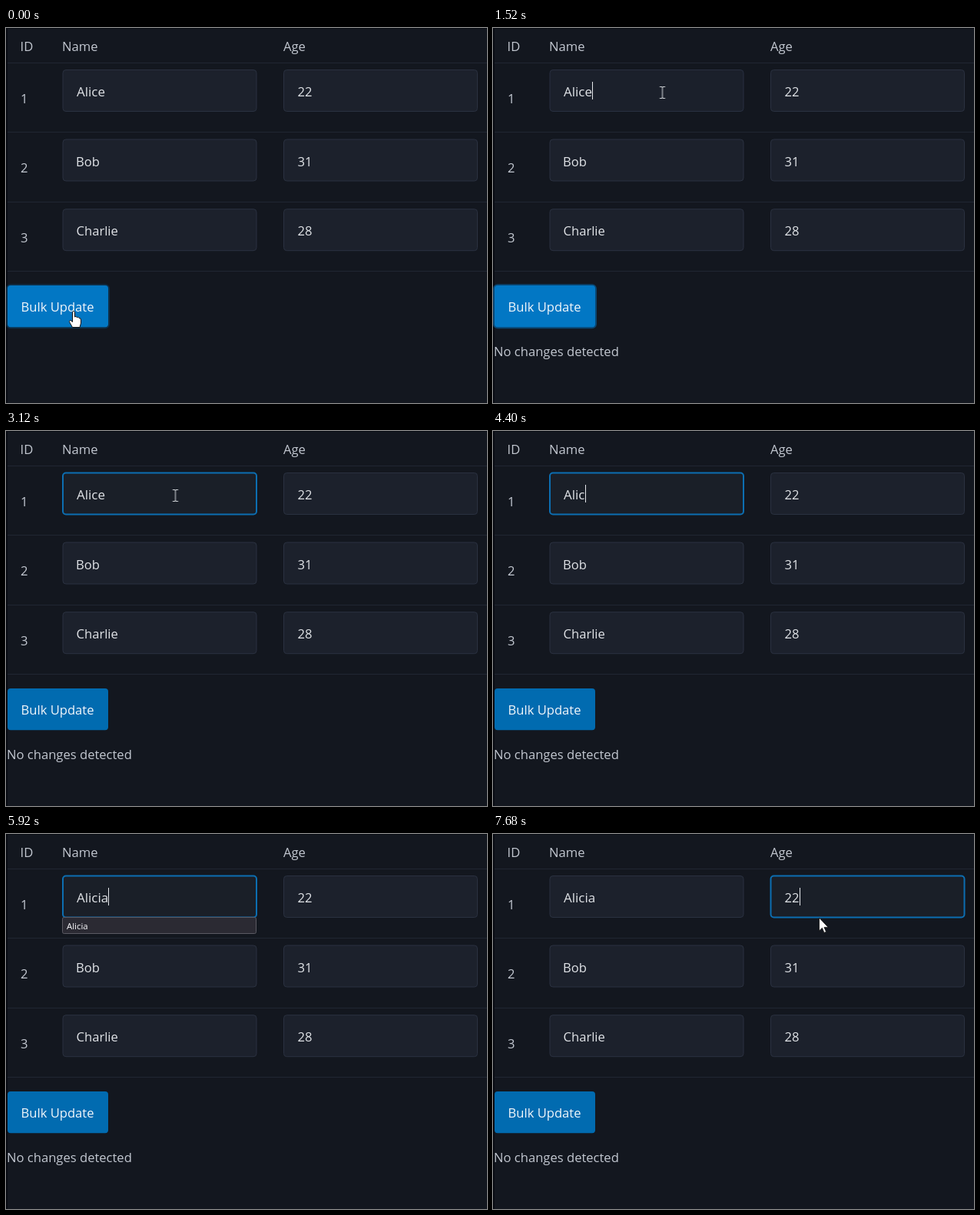
Write an HTML page that moves like this. It is 626x488 px and loops after 8000 ms.

```html
<!DOCTYPE html>
<html lang="en">
<head>
<meta charset="utf-8">
<title>Bulk update form</title>
<style>
html, body { margin: 0; width: 100%; height: 100%; overflow: hidden; background: #13171f; }
svg { display: block; width: 626px; height: 488px; }
text { font: 16.6px "Open Sans", "Noto Sans", sans-serif; fill: #c2c7d0; }
.value { fill: #e0e3e7; }
.name { font-size: 17px; }
.line { stroke: #202632; }
.box { fill: #1c212c; stroke: #2a3140; }
.focus { fill: #1a1f28; stroke: #0c6eb1; stroke-width: 2; }

/* 1% of the loop is 80 ms */
.anim { animation: 8s linear infinite; }
.step { animation: 8s step-end infinite; }

#button { animation-name: button; }
@keyframes button { 0%, 19% { fill: #0277c4; } 21.5%, 100% { fill: #016bb0; } }
#buttonRing { animation-name: buttonRing; }
@keyframes buttonRing { 0% { opacity: .5; } 1%, 19% { opacity: 1; } 21.5%, 100% { opacity: 0; } }
#message { animation-name: message; }
@keyframes message { 0% { opacity: 0; } 2%, 100% { opacity: 1; } }

#nameFocus { animation-name: nameFocus; }
@keyframes nameFocus { 0%, 19% { opacity: 0; } 21.5%, 82% { opacity: 1; } 84.5%, 100% { opacity: 0; } }
#ageFocus { animation-name: ageFocus; }
@keyframes ageFocus { 0%, 82% { opacity: 0; } 84.5%, 100% { opacity: 1; } }

#word1 { animation-name: word1; }
@keyframes word1 { 0% { opacity: 1; } 53%, 100% { opacity: 0; } }
#word2 { animation-name: word2; }
@keyframes word2 { 0% { opacity: 0; } 53% { opacity: 1; } 57%, 100% { opacity: 0; } }
#word3 { animation-name: word3; }
@keyframes word3 { 0% { opacity: 0; } 57% { opacity: 1; } 60%, 100% { opacity: 0; } }
#word4 { animation-name: word4; }
@keyframes word4 { 0% { opacity: 0; } 60%, 100% { opacity: 1; } }

#suggest { animation-name: suggest; }
@keyframes suggest { 0%, 60% { opacity: 0; } 61.5%, 81.99% { opacity: 1; } 82%, 100% { opacity: 0; } }
#suggest text { font-size: 11.4px; fill: #fbfbfe; }

#caretX { animation-name: caretX; }
@keyframes caretX {
  0% { transform: translateX(129px); }
  53% { transform: translateX(120px); }
  57% { transform: translateX(124px); }
  60% { transform: translateX(133px); }
  82%, 100% { transform: translateX(399px); }
}
#caret { animation-name: blink; }
@keyframes blink {
  0%, 26%, 39%, 66%, 88% { opacity: 0; }
  19%, 32%, 46%, 74%, 94%, 100% { opacity: 1; }
}

#pointer { animation-name: move; }
@keyframes move {
  0%, 5% { transform: translate(88px, 368px); }
  11% { transform: translate(231px, 203px); }
  16%, 75% { transform: translate(220.5px, 84px); }
  81%, 93% { transform: translate(470.5px, 93px); }
  96%, 100% { transform: translate(424px, 109px); }
}
#hand { animation-name: hand; }
@keyframes hand { 0% { opacity: 1; } 6.2%, 100% { opacity: 0; } }
#arrow { animation-name: arrow; }
@keyframes arrow {
  0%, 7.8%, 11.2%, 14.9%, 78.4% { opacity: 0; }
  6.2%, 9.8%, 13.4%, 77.5%, 95.9%, 100% { opacity: 1; }
}
#beam { animation-name: beam; }
@keyframes beam {
  0%, 9.8%, 13.4%, 53%, 77.5%, 95.9%, 100% { opacity: 0; }
  7.8%, 11.2%, 14.9%, 75%, 78.4% { opacity: 1; }
}
</style>
</head>
<body>
<svg viewBox="0 0 626 488">
  <defs>
    <rect id="field" width="252" height="54" rx="4"/>
    <g id="row">
      <use href="#field" x="74" class="box"/>
      <use href="#field" x="361.5" class="box"/>
    </g>
  </defs>

  <rect width="626" height="488" fill="#13171f"/>
  <path d="M0 0H626V1H2V488H0Z" fill="#080b12"/>
  <path class="line" d="M2 45.5H626M2 135.5H626M2 226.5H626M2 316.5H626"/>

  <text x="18.5" y="30">ID</text>
  <text x="73" y="30">Name</text>
  <text x="361" y="30">Age</text>
  <text x="19" y="98">1</text>
  <text x="19" y="188">2</text>
  <text x="19" y="279">3</text>

  <use href="#row" y="54.5"/>
  <use href="#row" y="145"/>
  <use href="#row" y="235.7"/>
  <g id="nameFocus" class="anim"><use href="#field" x="74" y="54.5" class="focus"/></g>
  <g id="ageFocus" class="anim"><use href="#field" x="361.5" y="54.5" class="focus"/></g>

  <g id="word1" class="step"><text class="value name" x="92" y="89">Alice</text></g>
  <g id="word2" class="step"><text class="value name" x="92" y="89">Alic</text></g>
  <g id="word3" class="step"><text class="value name" x="92" y="89">Alici</text></g>
  <g id="word4" class="step"><text class="value name" x="92" y="89">Alicia</text></g>
  <text class="value" x="91" y="180">Bob</text>
  <text class="value" x="91.5" y="270">Charlie</text>
  <text class="value" x="379.5" y="89">22</text>
  <text class="value" x="379.5" y="180">31</text>
  <text class="value" x="379.5" y="270">28</text>

  <g id="suggest" class="anim">
    <rect x="73.5" y="108.5" width="252" height="21" rx="2" fill="#2b2a33" stroke="#5b5a63"/>
    <text x="79" y="123.5">Alicia</text>
  </g>

  <rect id="buttonRing" class="anim" x="0" y="333.2" width="135" height="58" rx="6" fill="#0b4773"/>
  <rect id="button" class="anim" x="2" y="335" width="131" height="54.3" rx="4"/>
  <text x="19.5" y="369" style="fill:#f2f6fa">Bulk Update</text>
  <g id="message" class="step"><text x="1" y="427">No changes detected</text></g>

  <g id="caretX" class="step">
    <rect id="caret" class="step" y="70" width="1" height="23" fill="#e6e8ec"/>
  </g>

  <g id="pointer" class="anim">
    <path id="hand" class="step" fill="#fff" stroke="#111" stroke-linejoin="round"
      d="M-1.5 1.5Q0 -1 1.5 1.5V8Q3 6.5 4.3 8.5Q6 7.5 7 9.5Q9.5 9 9.5 12V16L8 21.5H-1.5L-5.5 14.5Q-5.5 11.5 -3 13L-1.5 14.5Z"/>
    <path id="arrow" class="step" fill="#fff" stroke="#111" stroke-width=".8"
      d="M.5 0V17L4.4 13.3L7 19.4L9.6 18.3L7 12.4H12.2Z"/>
    <path id="beam" class="step" fill="none" stroke="#dfe2e6"
      d="M-3.5 -7.5H-1L0 -6.8L1 -7.5H3.5M0 -7V7M-3.5 7.5H-1L0 6.8L1 7.5H3.5"/>
  </g>
</svg>
</body>
</html>
```
